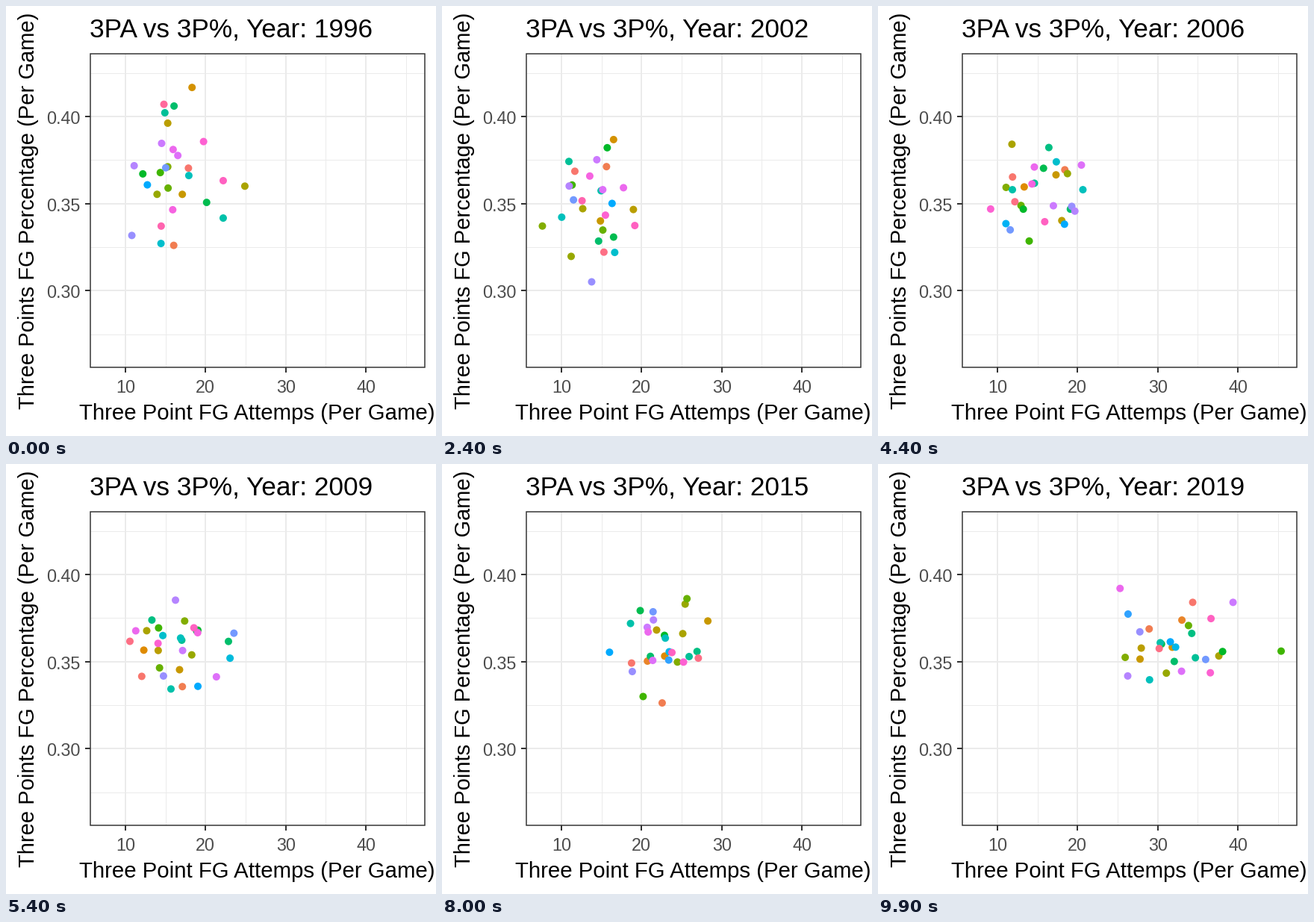
These frames come from a looping animation (576 px wide and 576 px high, 10 s). A matplotlib script:

```python
import numpy as np
import matplotlib.pyplot as plt
from matplotlib.animation import FuncAnimation
from matplotlib.patches import Rectangle

SIZE, FRAMES = 576, 100
FIRST, LAST = 1996, 2019
TEAMS = 37
YEARS = np.arange(FIRST, LAST + 1)
KNOTS = np.round((YEARS - FIRST) * (FRAMES - 1) / (LAST - FIRST))
LOW, HIGH = (7.4, 0.264), (45.4, 0.428)

# Teams that do not play every season
SPANS = {2: [(2013, 2019)], 3: [(2005, 2014)], 4: [(1996, 2002), (2015, 2019)],
         15: [(2002, 2019)], 19: [(1996, 2012)], 20: [(2003, 2005), (2008, 2013)],
         21: [(2014, 2019)], 22: [(2006, 2007)], 24: [(2009, 2019)],
         31: [(1996, 2008)], 34: [(1996, 2001)], 35: [(1996, 1997)],
         36: [(1998, 2019)]}

# Standout seasons: team, year, attempts, percentage
PEAKS = [(7, 1996, 24.9, .360), (35, 1996, 14.8, .407), (4, 1997, 17.0, .428),
         (26, 1999, 7.4, .264), (8, 2003, 11.0, .278), (29, 2004, 18.3, .401),
         (31, 2004, 23.6, .373), (25, 2009, 26.2, .381), (27, 2010, 21.6, .412),
         (3, 2012, 13.5, .295), (10, 2016, 31.6, .416), (11, 2017, 40.3, .357),
         (11, 2019, 45.4, .356), (30, 2019, 25.3, .392)]

plt.rcParams["font.family"] = "Liberation Sans"


def px(att):
    return 160 + 10.735 * (att - 10)


def py(pct):
    return 148 + 2333 * (0.40 - pct)


def hcl(h, c=100, l=65):
    """Polar LUV colour to sRGB."""
    a = np.radians(h)
    u = c * np.cos(a) / (13 * l) + 0.19784
    v = c * np.sin(a) / (13 * l) + 0.46834
    y = ((l + 16) / 116) ** 3
    x = 9 * y * u / (4 * v)
    z = 3 * y / v - x / 3 - 5 * y
    rgb = np.array([[3.2405, -1.5371, -0.4985],
                    [-0.9693, 1.8760, 0.0416],
                    [0.0556, -0.2040, 1.0572]]) @ [x, y, z]
    rgb = np.clip(rgb, 0, 1)
    return np.where(rgb > 0.00304, 1.055 * rgb ** (1 / 2.4) - 0.055, 12.92 * rgb)


def trend(years, values):
    return np.interp(YEARS, years, values)


def make_seasons():
    """Attempts and percentage of every team in every season."""
    mean = np.column_stack([
        trend([1996, 1997, 1998, 2003, 2011, 2016, 2019],
              [16.2, 16.8, 12.7, 14.7, 18.0, 24.3, 32.2]),
        trend([1996, 1999, 2001, 2004, 2009, 2012, 2014, 2019],
              [.366, .342, .354, .346, .365, .351, .358, .354])])
    spread = np.column_stack([trend([FIRST, LAST], [3.0, 4.0]),
                              trend([FIRST, LAST], [.020, .015])])
    # Each season keeps part of the team's last form
    form = np.random.default_rng(23).normal(size=(len(YEARS), TEAMS, 2))
    for y in range(1, len(YEARS)):
        form[y] = 0.6 * form[y - 1] + 0.8 * form[y]
    pos = mean[:, None] + spread[:, None] * np.clip(form, -2, 2)
    for team, year, *peak in PEAKS:
        pull = 0.5 ** np.abs(YEARS - year)
        pos[:, team] += pull[:, None] * (peak - pos[year - FIRST, team])
    return np.clip(pos, LOW, HIGH)


plays = np.array([[any(a <= y <= b for a, b in SPANS.get(i, [(FIRST, LAST)]))
                   for i in range(TEAMS)] for y in YEARS])
seasons = make_seasons()
colors = np.array([hcl(15 + 360 * i / TEAMS) for i in range(TEAMS)])

fig = plt.figure(figsize=(8, 8), dpi=72, facecolor="white")
ax = fig.add_axes([0, 0, 1, 1])
ax.set(xlim=(0, SIZE), ylim=(SIZE, 0))
ax.axis("off")

L, R, T, B = 112.5, 561, 63.5, 484
GRID, DARK, GREY = "#EBEBEB", "#333333", "#4D4D4D"


def line(xs, ys, color, width):
    ax.plot(xs, ys, color=color, lw=width, solid_capstyle="butt", zorder=1)


def label(x, y, text, size, ha="center", **kw):
    return ax.text(x, y, text, size=size, ha=ha, va="baseline",
                   rotation_mode="anchor", **kw)


for v in (15, 25, 35, 45):
    line([px(v)] * 2, [T, B], GRID, 1)
for v in (.275, .325, .375, .425):
    line([L, R], [py(v)] * 2, GRID, 1)
for v in (10, 20, 30, 40):
    line([px(v)] * 2, [T, B], GRID, 2)
    line([px(v)] * 2, [B, B + 6.5], DARK, 2)
    label(px(v), 517.5, str(v), 23.33, color=GREY)
for v in (.30, .35, .40):
    line([L, R], [py(v)] * 2, GRID, 2)
    line([L - 6.5, L], [py(v)] * 2, DARK, 2)
    label(99.5, py(v) + 10, f"{v:.2f}", 23.33, "right", color=GREY)

ax.add_patch(Rectangle((L, T), R - L, B - T, fill=False, ec=DARK, lw=1.5, zorder=4))
label(336.5, 554.5, "Three Point FG Attemps (Per Game)", 29.35)
label(38.5, 274, "Three Points FG Percentage (Per Game)", 29.17, rotation=90)
title = label(112, 41.5, "", 35.25, "left")
dots = ax.scatter([], [], s=10 ** 2, linewidths=0, zorder=3)


def draw(f):
    now = np.searchsorted(KNOTS, f, "right") - 1
    after = min(now + 1, len(YEARS) - 1)
    t = (f - KNOTS[now]) / max(KNOTS[after] - KNOTS[now], 1)
    # A team about to leave waits at its last position
    step = (seasons[after] - seasons[now]) * plays[after][:, None]
    att, pct = (seasons[now] + t * step)[plays[now]].T
    dots.set_offsets(np.column_stack([px(att), py(pct)]))
    dots.set_facecolor(colors[plays[now]])
    year = round(FIRST + (LAST - FIRST) * f / (FRAMES - 1))
    title.set_text(f"3PA vs 3P%, Year: {year}")
    return dots, title


anim = FuncAnimation(fig, draw, frames=FRAMES, interval=100, repeat=True, repeat_delay=0)
plt.show()
```
